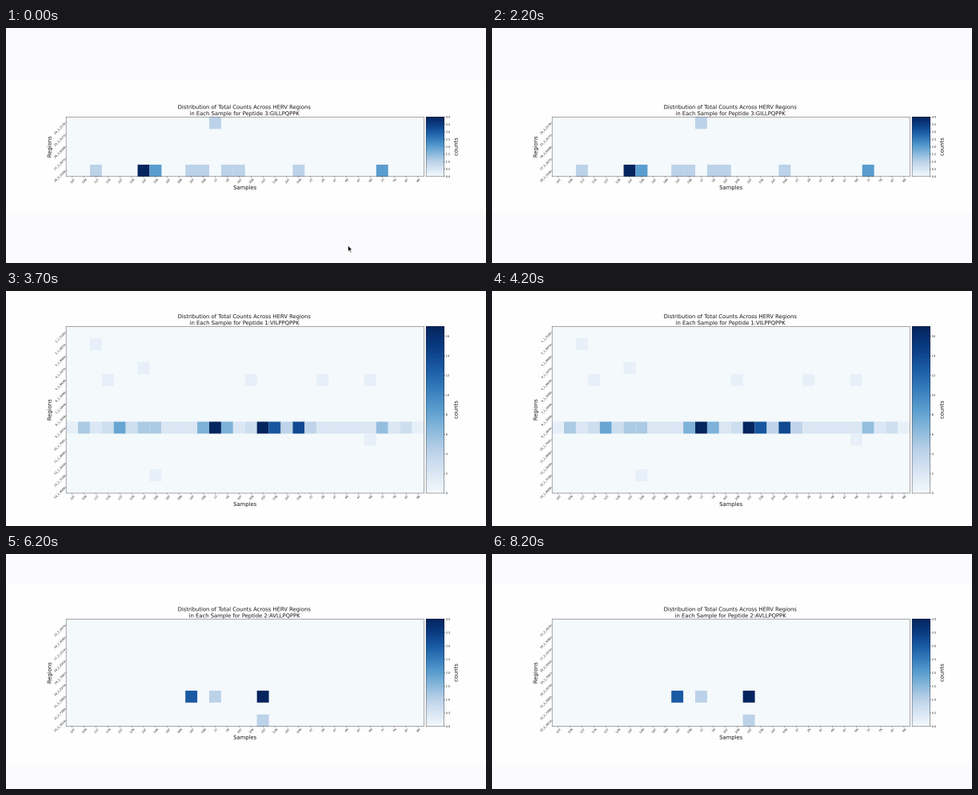
Recreate the animation shown at these times as a matplotlib script. Size 600x294 px, loop 8400 ms.

```python
import random

import numpy as np
import matplotlib.pyplot as plt
from matplotlib.animation import FuncAnimation
from matplotlib.colors import LinearSegmentedColormap
from matplotlib.patches import PathPatch, Polygon, Rectangle
from matplotlib.textpath import TextPath
from matplotlib.transforms import Affine2D

W, H, DPI = 600, 294, 100
STEP, COUNT = 100, 84
LEFT, CELL, COLS = 75.1, 14.91, 30
RIGHT = LEFT + CELL * COLS
MID_X, MID_Y = (LEFT + RIGHT) / 2, 148.6
BAR_L, BAR_R = 525.1, 547.4
BIG, SMALL = 6.8, 3.4
LINE = 0.26
INK = "#141414"

BLUES = LinearSegmentedColormap.from_list("blues", [
    "#f4f9fc", "#d9e6f4", "#bcd2e9", "#8cbadc", "#5b9ecf",
    "#377dbc", "#1a5ba4", "#0a3c82", "#05255f"])

# Patients in text order, each with a tumour and a normal sample
PATIENTS = sorted([*range(10, 13), 14, 18, 19, 1, 20, 23, 24, 2, 4, *range(6, 9)],
                  key=lambda n: f"{n}T")
SAMPLES = [f"{n}{kind}" for n in PATIENTS for kind in "TN"]

rng = random.Random(5)

fig = plt.figure(figsize=(W / DPI, H / DPI), dpi=DPI, facecolor="#fefefe")
ax = fig.add_axes([0, 0, 1, 1])
ax.set_xlim(0, W)
ax.set_ylim(H, 0)
ax.set_autoscale_on(False)
ax.axis("off")


def add(patch, group):
    ax.add_patch(patch)
    group.append(patch)


def box(group, x0, y0, x1, y1, **style):
    add(Rectangle((x0, y0), x1 - x0, y1 - y0, snap=False, **style), group)


def fill(group, x0, y0, x1, y1, color):
    box(group, x0, y0, x1, y1, facecolor=color, linewidth=0)


def tick(group, x0, y0, x1, y1):
    group += ax.plot([x0, x1], [y0, y1], color=INK, lw=LINE, snap=False)


def label(group, text, x, y, size, rot=0, ha="center", va="base"):
    turn = Affine2D().scale(1, -1).rotate_deg(-rot)
    path = TextPath((0, 0), text, size=size).transformed(turn)
    ext = path.get_extents()
    dx = {"left": -ext.x0, "right": -ext.x1, "base": 0,
          "center": -(ext.x0 + ext.x1) / 2}[ha]
    dy = {"top": -ext.y0, "base": 0, "center": -(ext.y0 + ext.y1) / 2}[va]
    path = path.transformed(Affine2D().translate(x + dx, y + dy))
    add(PathPatch(path, facecolor=INK, linewidth=0), group)


def heatmap(number, peptide, first, rows, counts, vmax, step, fmt):
    """Draw one slide; counts is a rows x COLS array."""
    g = []
    top, bottom = MID_Y - rows * CELL / 2, MID_Y + rows * CELL / 2

    # Tinted margins above and below the picture
    for y0, y1 in ((0, top - 45), (bottom + 45, H)):
        if y1 > y0:
            fill(g, 0, y0, W, y1, "#fbfbfd")

    fill(g, LEFT, top, RIGHT, bottom, BLUES(0.0))
    for row, col in np.argwhere(counts > 0):
        x, y = LEFT + col * CELL, top + row * CELL
        fill(g, x, y, x + CELL, y + CELL, BLUES(counts[row, col] / vmax))

    ramp = np.linspace(1, 0, 256)[:, None]
    g.append(ax.imshow(ramp, cmap=BLUES, extent=(BAR_L, BAR_R, bottom, top),
                       origin="upper", aspect="auto", interpolation="bilinear"))
    for x0, x1 in ((LEFT, RIGHT), (BAR_L, BAR_R)):
        box(g, x0, top, x1, bottom, fill=False, edgecolor=INK, linewidth=LINE)

    for i, name in enumerate(SAMPLES):
        x = LEFT + (i + 0.5) * CELL
        tick(g, x, bottom, x, bottom + 1.3)
        label(g, name, x + 0.4, bottom + 2.5, SMALL, 45, va="top")
    for i in range(rows):
        y = top + (i + 0.5) * CELL
        name = f"{first + i}_{number}_{rng.randint(1000, 9999)}"
        tick(g, LEFT - 1.3, y, LEFT, y)
        label(g, name, LEFT - 1.1, y, SMALL, 45, ha="right", va="top")
    for v in np.arange(0, vmax + 0.01, step):
        y = bottom - v / vmax * (bottom - top)
        tick(g, BAR_R, y, BAR_R + 1.3, y)
        label(g, fmt.format(v), BAR_R + 2.6, y, SMALL, ha="left", va="center")

    label(g, "Distribution of Total Counts Across HERV Regions",
          MID_X - 0.8, top - 10.1, BIG)
    label(g, f"in Each Sample for Peptide {number}:{peptide}",
          MID_X - 0.2, top - 2.1, BIG)
    label(g, "Samples", MID_X, bottom + 16.0, BIG)
    label(g, "Regions", 56.6, MID_Y, BIG, 90, ha="base", va="center")
    label(g, "counts", 564.6, MID_Y, BIG, 90, ha="base", va="center")
    return g


def sparse(rows, marks):
    """Empty counts with a few (row, columns, value) marks."""
    counts = np.zeros((rows, COLS))
    for row, cols, value in marks:
        counts[row, cols] = value
    return counts


def busy_row():
    """Low plateau fading at the ends, with peaks (centre, height, width)."""
    c = np.arange(COLS)
    level = 2.2 * np.sin(np.pi * (c + 0.3) / COLS) ** 0.3
    peaks = [(1, 4, 0.7), (3.9, 6.5, 0.8), (6.5, 4, 0.9), (12, 15, 0.95),
             (16.4, 19, 0.8), (19, 12, 0.7), (26, 4, 0.5), (28, 2, 0.5)]
    for centre, height, width in peaks:
        level += height * np.exp(-((c - centre) / width) ** 2)
    return np.clip(np.round(level), 0, 17)


dense = sparse(14, [(1, [2], 1), (3, [6], 1), (4, [3, 15, 21, 25], 1),
                    (9, [25], 1), (12, [7], 1)])
dense[8] = busy_row()
one = heatmap(1, "VILPPQPPK", 1, 14, dense, 17, 2, "{:.0f}")

two = heatmap(2, "AVLLPQPPK", 15, 9,
              sparse(9, [(6, [10], 3), (6, [12], 1), (6, [16], 4), (8, [16], 1)]),
              4, 0.5, "{:.1f}")

three = heatmap(3, "GILLPQPPK", 24, 5,
                sparse(5, [(0, [12], 1), (4, [2, 10, 11, 13, 14, 19], 1),
                           (4, [7, 26], 2), (4, [6], 4)]),
                4, 0.5, "{:.1f}")

ARROW = np.array([(0, 0), (0, 7.4), (1.7, 5.9), (2.9, 8.6),
                  (4.1, 8.1), (2.9, 5.4), (5.2, 5.3)])
cursor = Polygon(ARROW, closed=True, facecolor="black", edgecolor="white",
                 linewidth=0.4, zorder=5)
ax.add_patch(cursor)
START, END = np.array([427.6, 272.2]), np.array([34.0, 130.0])


def update(i):
    t = i * STEP
    current = three if t < 3700 else one if t < 6200 else two
    for group in (one, two, three):
        for artist in group:
            artist.set_visible(group is current)

    # The pointer rests, sweeps up and left, then is gone
    p = np.clip((t - 100) / 400, 0, 1)
    cursor.set_xy(ARROW + START + (END - START) * p * p * (3 - 2 * p))
    cursor.set_visible(t < 600)
    return one + two + three + [cursor]


anim = FuncAnimation(fig, update, frames=COUNT, interval=STEP,
                     repeat=True, repeat_delay=0, blit=False)
plt.show()
```
